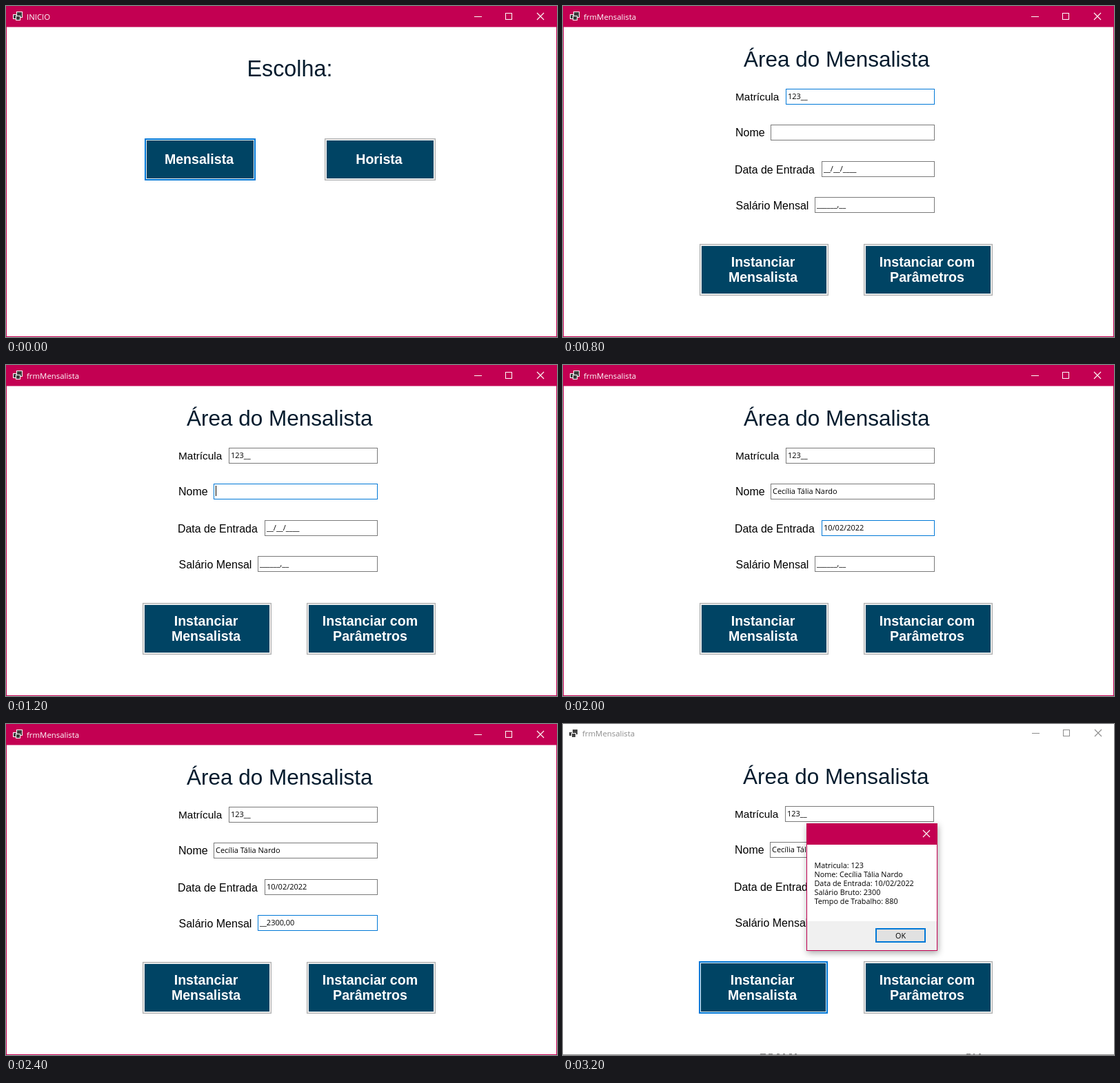
An HTML page that plays this animation: 799x480 px, repeating every 3800 ms.

```html
<!DOCTYPE html>
<html lang="pt">
<head>
<meta charset="utf-8">
<style>
  html, body { margin: 0; width: 100%; height: 100%; overflow: hidden; background: #fff; }
  svg { display: block; width: 799px; height: 480px; }
  text { white-space: pre; }
  .ui { font-family: "Open Sans", "Noto Sans", sans-serif; font-size: 11px; }
  .arial { font-family: "Liberation Sans", Arial, sans-serif; font-size: 16px; }
  .heading { font-size: 31.5px; fill: #051c2e; }
  .button { font-size: 19.6px; font-weight: bold; fill: #fff; text-anchor: middle; }
</style>
</head>
<body>
<svg id="stage" viewBox="0 0 799 480">
  <defs>
    <filter id="shadow" x="-20%" y="-20%" width="140%" height="140%">
      <feDropShadow dx="1" dy="3" stdDeviation="5" flood-color="#000" flood-opacity="0.35"/>
    </filter>
  </defs>
  <g id="scene"></g>
</svg>
<script>
const PINK = '#c30052', BLUE = '#0078d7', NAVY = '#004464';
const STEP = 400, LOOP = 3800;
const PERSON = 'Cecília Tália Nardo';
const scene = document.getElementById('scene');

const rect = (x, y, w, h, fill, stroke = 'none', width = 1) =>
  `<rect x="${x}" y="${y}" width="${w}" height="${h}" fill="${fill}" stroke="${stroke}" stroke-width="${width}"/>`;
const path = (d, color, width = 1) =>
  `<path d="${d}" fill="none" stroke="${color}" stroke-width="${width}"/>`;
const text = (x, y, str, cls, style = '') =>
  `<text x="${x}" y="${y}" class="${cls}" style="${style}">${str}</text>`;
const cross = (x, y, color) => path(`M${x} ${y}l10 10m0 -10l-10 10`, color, 1.1);

function titleBar(title, active) {
  const ink = active ? '#fff' : '#8c8c8c';
  const [dx, dy] = active ? [0, 0] : [-2, -1];
  const box = active ? '#3c3c3c' : '#444';
  const edge = active ? '#fff' : '#fff';
  const icon = rect(10.5, 12.5, 5, 6, box, edge) +
    rect(15.5, 8.5, 8, 8, box, edge) +
    rect(14.5, 14.5, 6, 6, box, edge);
  const wx = active ? 0 : 1, wy = active ? 0 : -2;
  return (active ? rect(0, 0, 799, 30.5, PINK) : '') +
    `<g transform="translate(${dx} ${dy})">${icon}</g>` +
    text(30 + dx, active ? 20 : 18, title, 'ui', `font-size:11.4px;fill:${ink}`) +
    `<g transform="translate(${wx} ${wy})">` +
    path('M679 15.5h11', ink) + rect(724.5, 10.5, 9, 9, 'none', ink) +
    cross(770, 10, ink) + '</g>';
}

// focus: 0 none, 1 hairline, 2 default-button outline
function button(x, y, w, h, lines, cx, baseline, focus = 0) {
  const frame = focus === 2
    ? rect(x + 1, y + 1, w - 2, h - 2, '#e8f0f5', BLUE, 2)
    : rect(x + .5, y + .5, w - 1, h - 1, '#e1e1e1', focus ? BLUE : '#adadad') +
      rect(x + 2, y + 2, w - 4, h - 4, focus ? '#fff' : '#f4f4f4');
  return frame + rect(x + 3, y + 3, w - 6, h - 6, NAVY) +
    lines.map((s, i) => text(cx, baseline + i * 22, s, 'arial button')).join('');
}

function field(label, size, labelX, labelY, x, y, value, focused) {
  return text(labelX, labelY, label, 'arial', `font-size:${size}px`) +
    rect(x + .5, y + .5, 538 - x, 22, '#fff', focused ? BLUE : '#7a7a7a') +
    text(x + 3, y + 15, value, 'ui');
}

function form(step, shift) {
  const values = [
    step < 2 ? '_____' : '123__',
    step < 4 ? '' : PERSON,
    step < 5 ? '__/__/____' : '10/02/2022',
    step < 6 ? '______,__' : '__2300,00'
  ];
  const focus = [, 0, 0, 1, 1, 2, 3][step];
  const rows = [
    ['Matrícula', 15.4, 250, 137, 323, 119.5],
    ['Nome', 16, 250, 189, 300.5, 172],
    ['Data de Entrada', 15.9, 249, 243, 375, 225],
    ['Salário Mensal', 16, 250.5, 295, 365, 277]
  ];
  const fields = rows.map((row, i) => {
    const [label, size, lx, ly, x, y] = row;
    return field(label, size, lx, ly, Math.ceil(x), Math.ceil(y), values[i], focus === i);
  }).join('');
  const caret = step === 3 ? path('M304.5 175v15', '#000') : '';
  return `<g transform="translate(${-shift} ${-shift})">` +
    text(262, 88, 'Área do Mensalista', 'arial heading') + fields + caret + '</g>' +
    button(198 - shift, 345 - shift, 187, 75 + shift, ['Instanciar', 'Mensalista'],
      290 - shift, 378, step === 7 ? 1 : step === 8 ? 2 : 0) +
    button(436, 345 - shift, 187, 75 + shift, ['Instanciar com', 'Parâmetros'], 528, 378);
}

function dialog() {
  const lines = ['Matricula: 123', `Nome: ${PERSON}`, 'Data de Entrada: 10/02/2022',
    'Salário Bruto: 2300', 'Tempo de Trabalho: 880'];
  return `<g filter="url(#shadow)">${rect(353, 144, 190, 185, '#fff')}</g>` +
    rect(353, 286, 190, 43, '#f0f0f0') +
    rect(353.5, 144.5, 189, 184, 'none', PINK) +
    rect(353, 144, 190, 31, PINK) + cross(522, 154, '#fff') +
    lines.map((s, i) => text(364.5, 209 + i * 13, s, 'ui', 'font-size:10.8px')).join('') +
    rect(454, 297, 71, 19, '#e1e1e1', BLUE, 2) +
    text(489.5, 311, 'OK', 'ui', 'font-size:10.8px;text-anchor:middle');
}

function startScreen() {
  return text(349.5, 102, 'Escolha:', 'arial heading', 'font-size:32.3px') +
    button(201, 192, 161, 61, ['Mensalista'], 280, 229, 2) +
    button(462, 192, 161, 61, ['Horista'], 541, 229);
}

function draw(step) {
  const active = step < 8;
  const content = step === 0 ? startScreen() : form(step, active ? 0 : 1);
  const edge = active
    ? rect(.5, .5, 798, 479, 'none', PINK)
    : path('M286 478.5h8m4 0h6m6 0h4m5 0h3m6 0h4m4 0h3M585 478.5h6m4 0h2m6 0h3', '#777') +
      path('M0 479.5h799', '#8f8f8f');
  scene.innerHTML = rect(0, 0, 799, 480, '#fff') + content +
    titleBar(step ? 'frmMensalista' : 'INICIO', active) + edge + (active ? '' : dialog());
}

let shown = -1;
const start = performance.now();
function tick() {
  const time = (performance.now() - start) % LOOP;
  const step = Math.min(8, Math.floor(time / STEP));
  if (step !== shown) draw(shown = step);
  requestAnimationFrame(tick);
}
tick();
</script>
</body>
</html>
```
